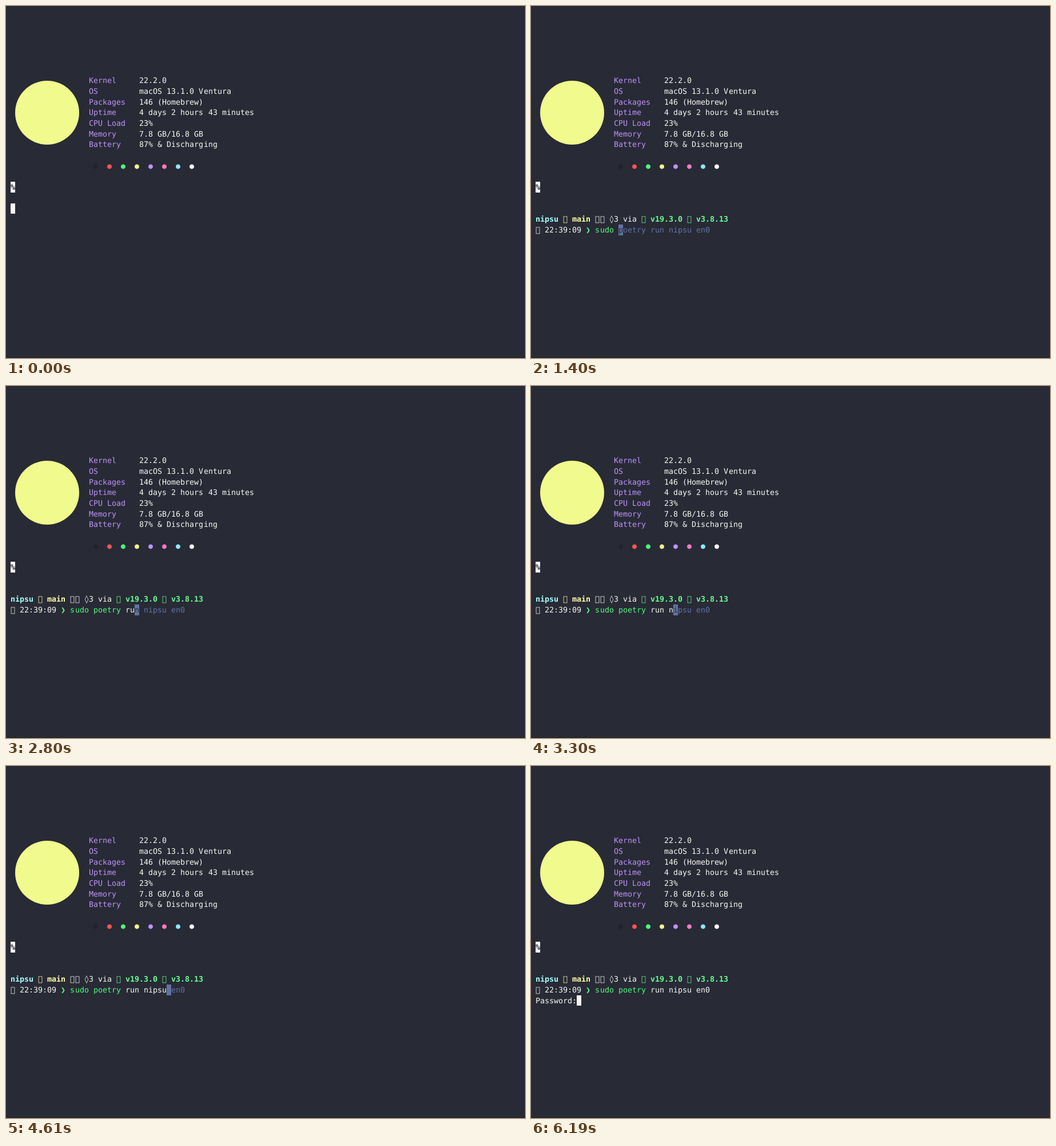
Write an HTML page with a canvas that moves like this. It is 908 px wide and 617 px high and loops after 8000 ms.

```html
<!DOCTYPE html>
<html lang="en">
<head>
<meta charset="utf-8">
<title>Terminal session</title>
<style>
html, body { margin: 0; height: 100%; overflow: hidden; background: #282a36; }
canvas { display: block; }
</style>
</head>
<body>
<canvas id="stage" width="908" height="617"></canvas>
<script>
const ctx = document.getElementById('stage').getContext('2d');
const LOOP = 8000;
const CW = 908 / 113, RH = 617 / 33;
const BG = '#282a36', FG = '#f8f8f2', DIM = '#6272a4';
const RED = '#ff5555', GREEN = '#50fa7b', YELLOW = '#f1fa8c', PURPLE = '#bd93f9';
const BRIGHT_GREEN = '#69ff94', BRIGHT_YELLOW = '#ffffa5', BRIGHT_CYAN = '#a4ffff';

const INFO = [
  ['Kernel', '22.2.0'],
  ['OS', 'macOS 13.1.0 Ventura'],
  ['Packages', '146 (Homebrew)'],
  ['Uptime', '4 days 2 hours 43 minutes'],
  ['CPU Load', '23%'],
  ['Memory', '7.8 GB/16.8 GB'],
  ['Battery', '87% & Discharging']
];
const DOTS = ['#21222c', RED, GREEN, YELLOW, PURPLE, '#ff79c6', '#8be9fd', '#ffffff'];
const MISSING = '\uf418'; // private-use icon, shown as an empty box

const COMMAND = 'sudo poetry run nipsu en0';
const PROMPT_AT = 110, ENTER_AT = 6130, PASSWORD_AT = 6190;
const KEYS = [830, 1020, 1130, 1240, 1400, 1630, 1790, 1900, 2020, 2190, 2390, 2530,
  2690, 2800, 3000, 3060, 3300, 3440, 3610, 3760, 3880, 4230, 4610, 4970, 5120, 5250, 5670];
const BACKSPACE = 23; // this key press deletes one character

// Cells sit on whole pixels
const colX = col => Math.round((col + 1) * CW);
const rowY = row => 9 + Math.round(row * RH);

function text(col, row, str, color, bold = false) {
  ctx.font = (bold ? 'bold ' : '') + '13.35px "DejaVu Sans Mono", monospace';
  ctx.textRendering = 'geometricPrecision';
  ctx.fillStyle = color;
  [...str].forEach((ch, i) => {
    if (ch !== ' ') ctx.fillText(ch, colX(col + i), rowY(row) + 14);
  });
}

function block(col, row, color = FG) {
  const x = colX(col), y = rowY(row);
  ctx.fillStyle = color;
  ctx.fillRect(x, y, colX(col + 1) - x, rowY(row + 1) - y);
}

function drawInfo() {
  ctx.fillStyle = YELLOW;
  ctx.beginPath();
  ctx.arc(72, 187, 56, 0, Math.PI * 2);
  ctx.fill();
  INFO.forEach(([label, value], i) => {
    text(17, 6 + i, label, PURPLE);
    text(28, 6 + i, value, FG);
  });
  DOTS.forEach((color, i) => text(18 + 3 * i, 14, '●', color));
  block(0, 16);
  text(0, 16, '%', BG, true);
}

function drawPrompt() {
  text(0, 19, 'nipsu', BRIGHT_CYAN, true);
  text(6, 19, MISSING + ' main', BRIGHT_YELLOW, true);
  text(13, 19, MISSING + MISSING + ' ◊3 via', FG);
  text(23, 19, MISSING + ' v19.3.0 ' + MISSING + ' v3.8.13', BRIGHT_GREEN, true);
  text(0, 20, MISSING + ' 22:39:09', FG);
  text(11, 20, '❯', BRIGHT_GREEN, true);
}

function drawCommand(t) {
  const pressed = KEYS.filter(k => k <= t).length;
  const n = pressed < BACKSPACE ? pressed : pressed - 2;
  const typed = COMMAND.slice(0, n);
  // Words stay red until they name a known command
  text(13, 20, typed.slice(0, 4), n === 2 || n >= 4 ? GREEN : RED);
  text(18, 20, typed.slice(5, 11), n >= 11 ? GREEN : RED);
  text(25, 20, typed.slice(12), FG);

  if (t >= ENTER_AT) return;
  const suggesting = n > 0 && n < COMMAND.length;
  block(13 + n, 20, suggesting ? DIM : FG);
  if (suggesting) {
    text(13 + n, 20, COMMAND[n], BG);
    text(14 + n, 20, COMMAND.slice(n + 1), DIM);
  }
}

function draw(t) {
  ctx.fillStyle = BG;
  ctx.fillRect(0, 0, 908, 617);
  ctx.fillStyle = '#1c1d26';
  ctx.fillRect(0, 616, 908, 1);
  drawInfo();
  if (t < PROMPT_AT) return block(0, 18);
  drawPrompt();
  drawCommand(t);
  if (t >= ENTER_AT) {
    const reply = t >= PASSWORD_AT ? 'Password:' : '';
    text(0, 21, reply, FG);
    block(reply.length, 21);
  }
}

const start = performance.now();
function tick() {
  draw((performance.now() - start) % LOOP);
  requestAnimationFrame(tick);
}
tick();
</script>
</body>
</html>
```
